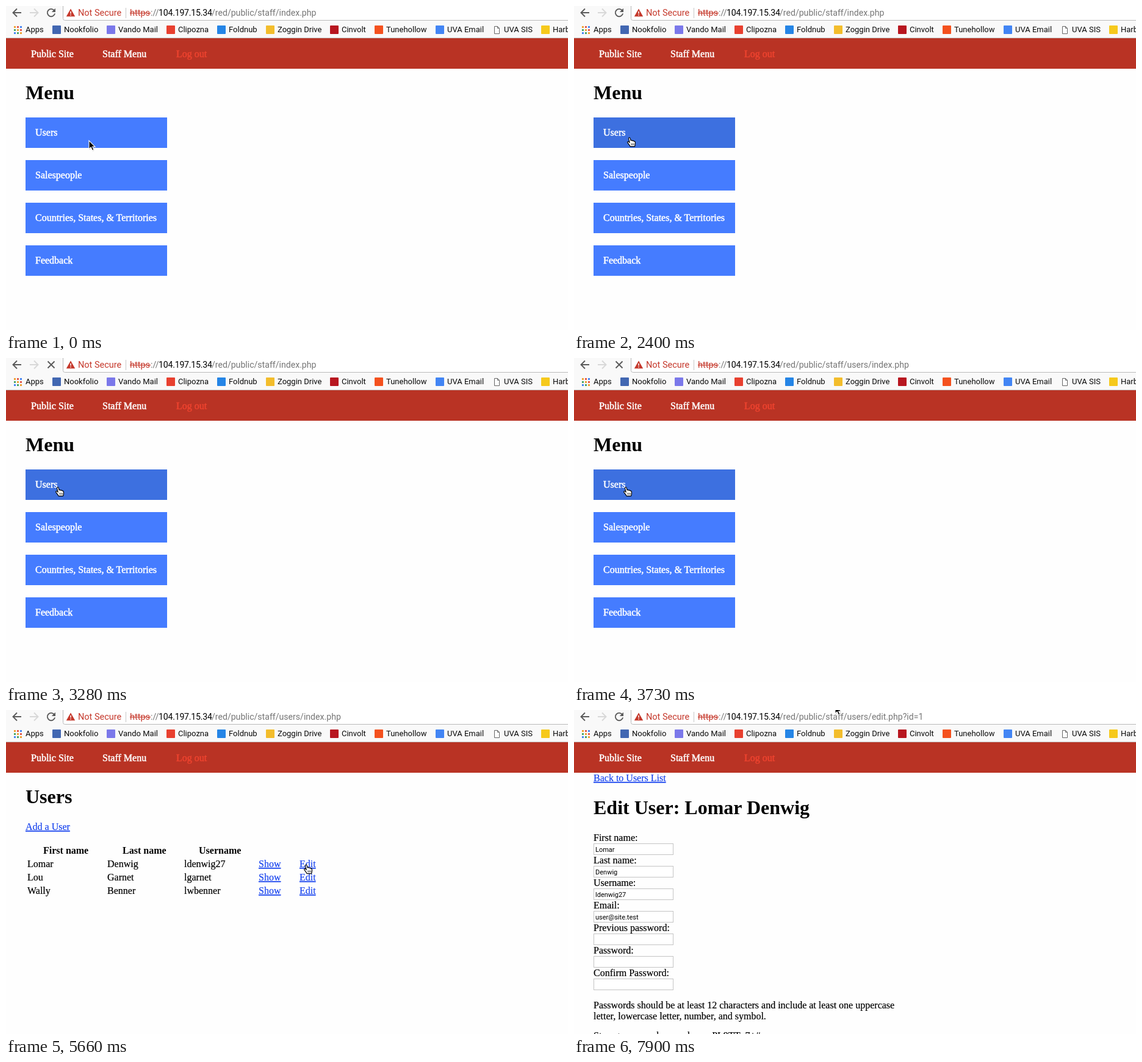
Recreate the animation shown at these times as an HTML page. Size 921 by 532 pixels, loop 8000 ms.

```html
<!DOCTYPE html>
<html lang="en">
<head>
<meta charset="utf-8">
<title>Staff area</title>
<style>
  html, body { margin: 0; width: 100%; height: 100%; overflow: hidden; background: #fff; }
  svg { display: block; }
  text { white-space: pre; }
  .serif, .light, .link { font: 16px "Liberation Serif", serif; stroke: #000; stroke-width: .2px; }
  .bold { font-weight: bold; stroke: none; }
  .h1 { font: bold 32px "Liberation Serif", serif; }
  .light { fill: #fff; stroke: #fff; stroke-width: .5px; }
  .dim { fill: #ee432f; stroke: #ee432f; }
  .link { fill: #1743ee; stroke: #1743ee; text-decoration: underline; }
  .mark { font: 13px Roboto, sans-serif; fill: #0a0a0a; }
  .url { font: 14.1px Roboto, sans-serif; fill: #757575; }
  .host { fill: #000; letter-spacing: -.2px; }
  .alert { font-size: 14.5px; fill: #c5382b; }
  .field { font: 11px Roboto, sans-serif; }
</style>
</head>
<body>
<svg id="stage" width="921" height="532" viewBox="0 0 921 532"></svg>
<script>
const LOOP = 8000;
const ITEM = { x: 32, y: 183, w: 232, h: 50, pitch: 70 };
const ROW = { y: 258, pitch: 22 };

const text = (x, y, cls, s) =>
  `<text x="${x}" y="${y}" class="${cls}">${s.replace(/&/g, '&amp;')}</text>`;
const rect = (x, y, w, h, fill, more = '') =>
  `<rect x="${x}" y="${y}" width="${w}" height="${h}" fill="${fill}" ${more}/>`;
const line = (d, color, width) =>
  `<path d="${d}" fill="none" stroke="${color}" stroke-width="${width}"/>`;
const group = (id, body) => `<g id="${id}">${body}</g>`;

const bookmarks = [
  ['Apps', 'grid'], ['Nookfolio', '#4267b2'], ['Vando Mail', '#7b78ea'], ['Clipozna', '#e8402f'],
  ['Foldnub', '#2585e6'], ['Zoggin Drive', '#f3bd2c'], ['Cinvolt', '#b8161f'], ['Tunehollow', '#f4511e'],
  ['UVA Email', '#4285f4'], ['UVA SIS', 'sheet'], ['Harbor', '#f6c91c']
];

function icon(kind) {
  if (kind === 'sheet') {
    return '<path d="M4.5 2.5H9.5L12.5 5.5V14.5H4.5ZM9.5 2.5V5.5H12.5" fill="#fff" stroke="#666"/>';
  }
  if (kind !== 'grid') return rect(1, 1, 14, 14, kind, 'rx="1"');
  const colors = ['#e2574c', '#f0a030', '#4aa564', '#4285f4'];
  return Array.from({ length: 9 }, (_, i) =>
    rect(1 + i % 3 * 5, 2 + (i / 3 | 0) * 5, 3, 3, colors[(i * 3 + 1) % 4])).join('');
}

const bookmarkBar = () => bookmarks.map(([label, kind]) =>
  `<g class="entry">${icon(kind)}${text(20, 12, 'mark', label)}</g>`).join('');

// Each bookmark starts a fixed gap after the label before it
function layBookmarks() {
  let x = 12;
  for (const entry of document.querySelectorAll('.entry')) {
    entry.setAttribute('transform', `translate(${Math.round(x)} 31)`);
    x += entry.querySelector('text').getComputedTextLength() + 33;
  }
}

function browser() {
  const gray = '#5a5a5a';
  return rect(0, 0, 921, 52, '#f9f9f9') + rect(0, 52, 921, 1, '#c3b9b7') +
    line('M25 11H12M18 4.5 11.5 11 18 17.5', gray, 1.9) +
    line('M39 11H52M46 4.5 52.5 11 46 17.5', '#d8d8d8', 1.9) +
    group('reload', line('M79.2 7.6A6.2 6.2 0 1 0 80.1 12.4', gray, 1.9) +
      `<path d="M81 3.8V10H74.8Z" fill="${gray}"/>`) +
    group('stop', line('M68.5 5.5 79.5 16.5M79.5 5.5 68.5 16.5', gray, 1.9)) +
    rect(93.5, -6.5, 850, 30, '#fff', 'rx="3" stroke="#b9b9b9"') +
    '<path d="M106 4.5 113.2 17.2H98.8Z" fill="#c5382b"/>' +
    line('M106 8.7V12.8M106 14V15.6', '#fff', 1.5) +
    text(118, 16, 'url alert', 'Not Secure') +
    rect(196, 3, 1, 17, '#c8c8c8') +
    text(203, 16, 'url alert', 'https') + rect(203, 11, 34, 1.2, '#c5382b') +
    text(237, 16, 'url', '://') +
    text(250, 16, 'url host', '104.197.15.34') +
    '<text id="address" x="337" y="16" class="url"></text>' + bookmarkBar();
}

const nav = () => rect(0, 53, 921, 50, '#b93324') + text(41, 84, 'light', 'Public Site') +
  text(158, 84, 'light', 'Staff Menu') + text(279, 84, 'light dim', 'Log out');

function menuPage() {
  const items = ['Users', 'Salespeople', 'Countries, States, & Territories', 'Feedback'];
  return text(32, 153, 'h1', 'Menu') + items.map((s, i) => {
    const y = ITEM.y + ITEM.pitch * i;
    return rect(ITEM.x, y, ITEM.w, ITEM.h, '#457cff', `id="item${i}"`) + text(ITEM.x + 16, y + 30, 'light', s);
  }).join('');
}

function usersPage() {
  const rows = [
    ['Lomar', 'Denwig', 'ldenwig27'],
    ['Lou', 'Garnet', 'lgarnet'],
    ['Wally', 'Benner', 'lwbenner']
  ];
  const cols = [35, 166, 292, 414, 481];
  return text(32, 153, 'h1', 'Users') + text(32, 197, 'link', 'Add a User') +
    text(61, 236, 'serif bold', 'First name') + text(191, 236, 'serif bold', 'Last name') +
    text(316, 236, 'serif bold', 'Username') +
    rows.map((row, r) => [...row, 'Show', 'Edit'].map((s, c) =>
      text(cols[c], ROW.y + ROW.pitch * r, c < 3 ? 'serif' : 'link', s)).join('')).join('');
}

function editPage() {
  const fields = [
    ['First name:', 'Lomar'], ['Last name:', 'Denwig'], ['Username:', 'ldenwig27'],
    ['Email:', 'user@site.test'], ['Previous password:', ''], ['Password:', ''], ['Confirm Password:', '']
  ];
  return text(32, 117, 'link', 'Back to Users List') +
    text(32, 171, 'h1', 'Edit User: Lomar Denwig') +
    fields.map(([label, value], i) => text(32, 215 + 37 * i, 'serif', label) +
      rect(32.5, 219.5 + 37 * i, 130, 18, '#fff', 'stroke="#c4c4c4"') +
      text(35, 233 + 37 * i, 'field', value)).join('') +
    text(32, 490, 'serif', 'Passwords should be at least 12 characters and include at least one uppercase') +
    text(32, 508, 'serif', 'letter, lowercase letter, number, and symbol.') +
    text(32, 540, 'serif', 'Strong password example: vmPL9TTx7+#');
}

// Both pointers are drawn with the hot spot at 0,0
function pointers() {
  const arrow = 'M0 0V14L3.2 11 5.4 16.2 7.9 15.1 5.7 10.1H10Z';
  const hand = 'M0 14.6-1 12.6-4 8.6Q-4.8 7-3.4 6.6-2.2 6.4-.8 8.3L-2.4 2.2Q-2.7.2-1.4 0-.2-.1.2 1.6L1.2 5' +
    'Q2.4 3.8 3.7 5.4 5.4 4.4 6.3 6.2 8.2 5.8 8.4 8.2 8.8 10.2 7.6 14.6Z';
  return group('arrow', `<path d="${arrow}" transform="translate(.6 1.4)" opacity=".2"/>` +
      `<path d="${arrow}" stroke="#fff" stroke-width="1.1"/>`) +
    group('hand', `<path d="${hand}" fill="#fff" stroke="#000" stroke-width="1.2" stroke-linejoin="round"/>` +
      line('M2 9.5V12.6M4.1 9.5V12.6M6.2 9.5V12.6', '#000', .8));
}

document.getElementById('stage').innerHTML = rect(0, 0, 921, 532, '#fefefe') + nav() +
  group('menu', menuPage()) + group('users', usersPage()) + group('edit', editPage()) +
  browser() + pointers();
layBookmarks();

const $ = id => document.getElementById(id);
const show = (id, on) => $(id).setAttribute('visibility', on ? 'visible' : 'hidden');
const between = (v, a, b) => v >= a && v <= b;

// Pointer moves: first step, last step, end x, end y
const moves = [
  [150, 1050, 111, 221], [1200, 1200, 118, 212], [1650, 1950, 93, 217],
  [2400, 2690, 89, 214], [2990, 3280, 86, 212], [3880, 3880, 189, 216],
  [4180, 4330, 341, 247], [4620, 4620, 412, 259], [4770, 5220, 487, 256],
  [5660, 5660, 493, 254], [7760, 7900, 428, -8]
];

// The screen refreshes about every 148 ms, so moves advance in even jumps
function pointerAt(t) {
  let x = 136, y = 221;
  for (const [start, end, toX, toY] of moves) {
    if (t < start) break;
    const jumps = Math.round((end - start) / 148);
    const done = t >= end ? jumps : Math.floor((t - start) / (end - start) * jumps);
    const p = (done + 1) / (jumps + 1);
    x += (toX - x) * p;
    y += (toY - y) * p;
  }
  return [Math.round(x), Math.round(y)];
}

const overItem = (x, y) => between(x, ITEM.x, ITEM.x + ITEM.w) && between(y, ITEM.y, ITEM.y + ITEM.h);
const overLink = (x, y) => (between(x, 414, 450) || between(x, 481, 508)) &&
  between(y, ROW.y - 14, ROW.y + 4);

function draw(t) {
  const page = t < 3880 ? 'menu' : t < 7160 ? 'users' : 'edit';
  for (const id of ['menu', 'users', 'edit']) show(id, id === page);

  const [x, y] = pointerAt(t);
  const focused = t >= 1650;
  const hover = page === 'menu' && focused && overItem(x, y);
  const isHand = hover || (page === 'users' && overLink(x, y));
  for (const id of ['arrow', 'hand']) $(id).setAttribute('transform', `translate(${x} ${y})`);
  show('hand', isHand);
  show('arrow', !isHand);
  $('item0').setAttribute('fill', hover ? '#3d70e0' : '#457cff');

  const loading = between(t, 3130, 3879) || between(t, 6860, 7159);
  show('stop', loading);
  show('reload', !loading);
  $('address').textContent = '/red/public/staff/' +
    (t < 3730 ? 'index.php' : t < 7010 ? 'users/index.php' : 'users/edit.php?id=1');
}

function tick() {
  draw(performance.now() % LOOP);
  requestAnimationFrame(tick);
}
tick();
</script>
</body>
</html>
```
